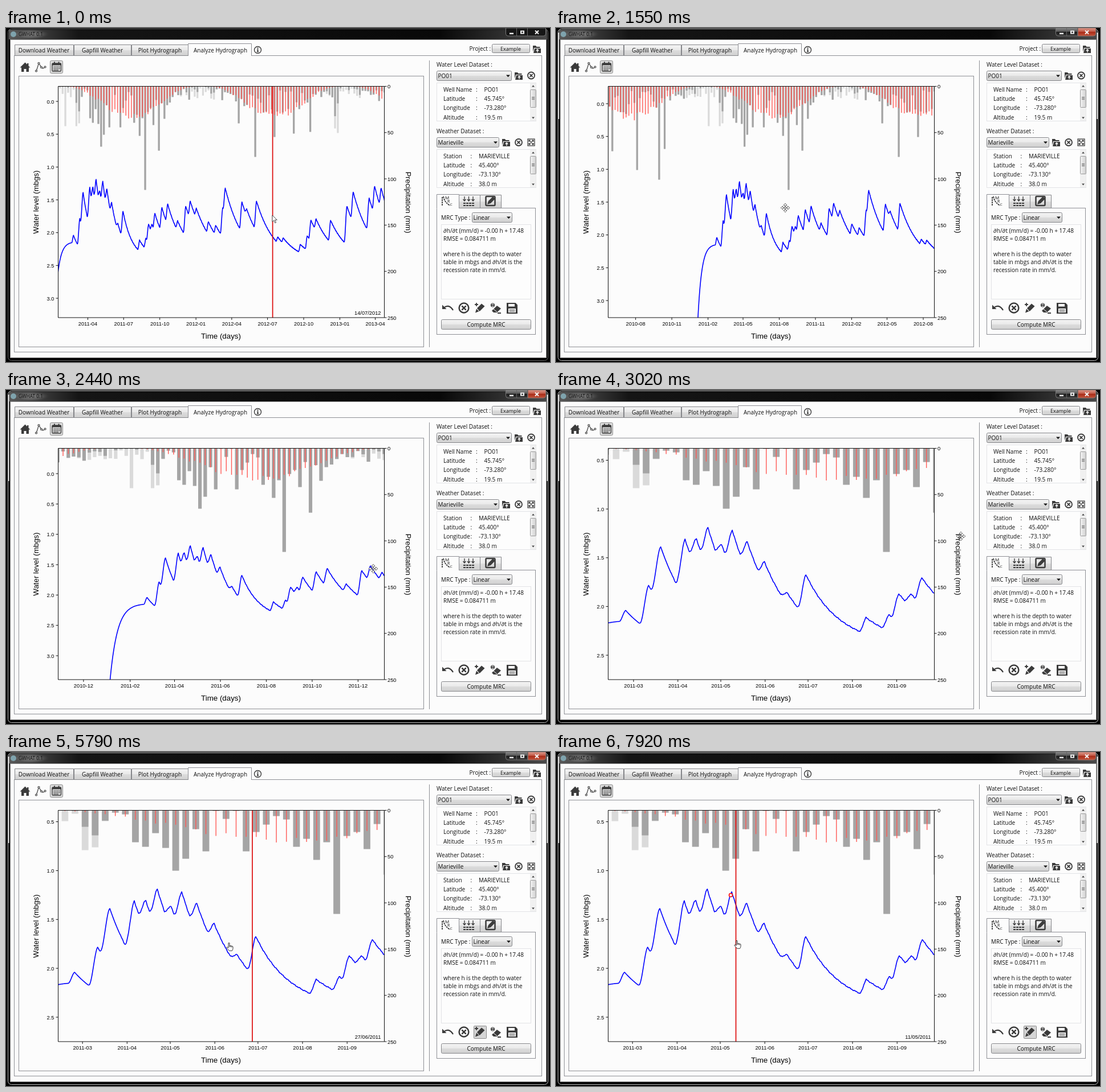
An HTML page for the animation above (8 s loop, 954x587 px).

```html
<!DOCTYPE html>
<html lang="en">
<head>
<meta charset="utf-8">
<title>Hydrograph analysis</title>
<style>
html, body { margin: 0; width: 100%; height: 100%; overflow: hidden; background: #000; }
svg { display: block; }
text { font: 10px "Open Sans", "Noto Sans", sans-serif; fill: #111; white-space: pre; }
.plot text { font: 9.3px "Liberation Sans", sans-serif; fill: #000; }
.plot .title { font-size: 13.33px; }
.mid { text-anchor: middle; }
.end { text-anchor: end; }
.box { fill: #fcfcfc; stroke: #8e8f95; }
.pale { fill: #fdfdfd; stroke: #e2e3e6; }
.btn { fill: url(#face); stroke: #85868a; }
.ink { fill: #3b3b3b; }
.pen { fill: none; stroke: #3b3b3b; stroke-width: 1.8; }
</style>
</head>
<body>
<svg width="954" height="587" viewBox="0 0 954 587">
  <defs>
    <linearGradient id="face" x2="0" y2="1"><stop stop-color="#f4f4f4"/><stop offset=".5" stop-color="#e9e9e9"/><stop offset=".52" stop-color="#dcdcdc"/><stop offset="1" stop-color="#d0d0d0"/></linearGradient>
    <linearGradient id="thumb" x2="1" y2="0"><stop stop-color="#f3f3f3"/><stop offset="1" stop-color="#cfcfcf"/></linearGradient>
    <linearGradient id="red" x2="0" y2="1"><stop stop-color="#dc9a8c"/><stop offset=".45" stop-color="#c25a48"/><stop offset=".5" stop-color="#a82a16"/><stop offset="1" stop-color="#c4553c"/></linearGradient>
    <linearGradient id="grey" x2="0" y2="1"><stop stop-color="#8a8a8a"/><stop offset=".45" stop-color="#555"/><stop offset=".5" stop-color="#1a1a1a"/><stop offset="1" stop-color="#3a3a3a"/></linearGradient>
    <linearGradient id="bar" x2="1" y2="0"><stop stop-color="#5a5a5a"/><stop offset=".13" stop-color="#151515"/><stop offset=".8" stop-color="#080808"/><stop offset="1" stop-color="#4a4a4a"/></linearGradient>
    <radialGradient id="haze"><stop stop-color="#999" stop-opacity=".75"/><stop offset=".6" stop-color="#777" stop-opacity=".5"/><stop offset="1" stop-color="#444" stop-opacity="0"/></radialGradient>
    <clipPath id="axes"><path d="M92 102.500H663V509H92z"/></clipPath>
    <g id="folder"><path class="ink" d="M-7 -6h5l1.500 2h6v2h-10.500l-2 7z"/><path class="ink" d="M-4 -1h11v8h-13z"/><path d="M1 6v-5m-2 2l2 -2.500l2 2.500" fill="none" stroke="#fff" stroke-width="1.300"/></g>
    <g id="cross"><circle class="pen" r="6"/><path class="pen" d="M-2.600 -2.600l5.200 5.200m0 -5.200l-5.200 5.200"/></g>
    <path id="down" d="M-3.500 -1.500h7l-3.500 3.800z" fill="#111"/>
  </defs>

  <!-- window -->
  <rect width="954" height="587"/>
  <rect id="rim" x="3.500" y="1.500" width="947" height="583" rx="6" fill="#050505"/>
  <rect x="5" y="3" width="944" height="17" fill="url(#bar)"/>
  <path id="shine" d="M4.500 8v152M949.500 8v152" stroke="#d8d8d8" stroke-width="2"/>
  <ellipse cx="43" cy="11" rx="33" ry="9" fill="url(#haze)"/>
  <circle cx="13" cy="11" r="5" fill="#7fa3ad"/>
  <text x="22" y="14" style="font-size:8.300px;fill:#080808">GWHAT 0.1</text>
  <path id="buttons" d="M876.500 0v10q0 4 4 4h62q4 0 4 -4v-10z" stroke="#777"/>
  <path id="close" d="M915.500 0h31v10q0 4 -4 4h-27z" fill="url(#red)" stroke="#8b6a64"/>
  <path d="M895.500 0v14M914.500 0v14" stroke="#666"/>
  <path d="M883 8.500h7v2.500h-7zM902 4.500h7v6h-7zM904 6.500v2h3v-2z" fill="#eee" fill-rule="evenodd"/>
  <path d="M928 4.500l6 6m0 -6l-6 6" stroke="#f4f4f4" stroke-width="2"/>
  <rect x="7.500" y="20.500" width="940" height="559" fill="#fcfcfc" stroke="#8a8a8a"/>

  <!-- main tabs -->
  <rect class="box" x="14.500" y="48.500" width="925" height="521"/>
  <path class="btn" d="M15.500 48.500v-19h103v19zM119.500 48.500v-19h100v19zM220.500 48.500v-19h99v19z"/>
  <path d="M319.500 49.500v-22h111v22" fill="#fcfcfc"/>
  <path d="M319.500 49v-21.500h111v21.500" fill="none" stroke="#8e8f95"/>
  <text class="mid" x="66.500" y="43">Download Weather</text>
  <text class="mid" x="169" y="43">Gapfill Weather</text>
  <text class="mid" x="270" y="43">Plot Hydrograph</text>
  <text class="mid" x="376" y="42.500">Analyze Hydrograph</text>
  <circle class="pen" cx="441.500" cy="38.500" r="6" style="stroke-width:1.400"/>
  <path class="ink" d="M440.500 34.500h2v2h-2zM440 37.500h2.500v4h1v1h-4v-1h1v-3h-.500z"/>

  <!-- toolbar -->
  <path class="ink" d="M24.500 69.500l9 -9l3.500 3.500v-2h2.500v4.500l3 3h-2.500v7.500h-4.500v-5h-4v5h-4.500v-7.500z"/>
  <path class="pen" d="M53 76l4.500 -14l4 6l3 3l4 -2" style="stroke-width:1.200"/>
  <g class="pen" style="stroke-width:1.200;fill:#fcfcfc"><circle cx="53" cy="75.500" r="1.500"/><circle cx="57.500" cy="62" r="1.500"/><circle cx="62" cy="69" r="1.500"/><circle cx="68.500" cy="68.500" r="1.500"/></g>
  <rect x="77.500" y="57.500" width="22" height="22" rx="2" fill="#dcdcdc" stroke="#888"/>
  <rect class="pen" x="81" y="62" width="15.500" height="14" rx="1.500" style="stroke-width:1.400"/>
  <path class="ink" d="M81 62h15.500v3.500h-15.500zM84 59.500h2v4h-2zM91.500 59.500h2v4h-2z"/>
  <path d="M83.500 68.500h11M83.500 71.500h11M83.500 74h8" stroke="#3b3b3b" stroke-width="1.500" stroke-dasharray="2 1"/>
  <rect class="box" x="22.500" y="84.500" width="710" height="476"/>
  <path d="M742.500 57v504" stroke="#8e8f95"/>

  <!-- plot -->
  <g class="plot">
    <g clip-path="url(#axes)">
      <path id="snow" fill="#dadada"/>
      <path id="rain" fill="#a5a5a5"/>
      <path id="evap" stroke="#ff5a55" stroke-width="1.400"/>
      <path id="level" fill="none" stroke="#00f" stroke-width="1.600" stroke-linejoin="round"/>
      <path id="line" stroke="#dc0a0a" stroke-width="1.700"/>
      <circle id="pick" cx="306.500" cy="251.500" r="3" fill="#fff" stroke="red" stroke-width="1.500"/>
    </g>
    <path d="M91.500 102.500h572v406.500h-572z" fill="none" stroke="#111"/>
    <g id="ticks"></g>
    <text id="date" class="end" x="657.500" y="503.500"></text>
    <text class="title mid" x="377" y="546">Time (days)</text>
    <text class="title mid" transform="translate(56.500 306) rotate(-90)">Water level (mbgs)</text>
    <text class="title mid" transform="translate(701 306.500) rotate(90)">Precipitation (mm)</text>
  </g>

  <!-- side panel -->
  <text x="812.500" y="40">Project :</text>
  <rect class="btn" x="852.500" y="28.500" width="66" height="15" rx="2"/>
  <text class="mid" x="885" y="39.500" style="font-size:9px">Example</text>
  <use href="#folder" x="931" y="37"/>
  <text x="755" y="68">Water Level Dataset :</text>
  <text x="755" y="185">Weather Dataset :</text>
  <use href="#folder" x="899" y="84"/><use href="#cross" x="921" y="83.500"/>
  <use href="#folder" x="877" y="201"/><use href="#cross" x="899" y="201"/>
  <rect class="pen" x="915" y="195" width="12" height="12" style="stroke-width:1.200"/>
  <path class="pen" d="M917 197l8 8m0 -8l-8 8M917 200v-3h3M922 197h3v3M917 202v3h3M922 205h3v-3" style="stroke-width:1.200"/>

  <rect class="box" x="755.500" y="316.500" width="173" height="222"/>
  <path class="btn" d="M794.500 316.500v-23h37v23zM831.500 316.500v-23h37v23z"/>
  <path d="M755.500 317.500v-25h39v25" fill="#fcfcfc"/>
  <path d="M755.500 317v-24.500h39v24.500" fill="none" stroke="#8e8f95"/>
  <path class="pen" d="M765 312v-16M767 296q2 11 12 16" stroke-dasharray="3 1"/>
  <g style="font-weight:bold"><text x="770" y="301" style="font-size:8px">M</text><text x="774" y="307" style="font-size:7px">R</text><text x="779" y="312" style="font-size:6px">C</text></g>
  <path class="pen" d="M804 296v8m-2.500 -3l2.500 3l2.500 -3M811.500 296v8m-2.500 -3l2.500 3l2.500 -3M819 296v8m-2.500 -3l2.500 3l2.500 -3" style="stroke-width:1.300"/>
  <path class="pen" d="M802 308h19M802 312h19" stroke-dasharray="4 1"/>
  <rect class="pen" x="841.500" y="296" width="16" height="16" rx="1.500" style="stroke-width:2.500"/>
  <path class="ink" d="M844 310l2 -6l8 -8l4 4l-8 8z"/>
  <text x="763" y="337">MRC Type :</text>
  <rect class="pale" x="763.500" y="345.500" width="157" height="131"/>
  <text x="767" y="360">∂h/∂t (mm/d) = -0.00 h + 17.48</text>
  <text x="767" y="373.500">RMSE = 0.084711 m</text>
  <text x="767" y="401">where h is the depth to water</text>
  <text x="767" y="415">table in mbgs and ∂h/∂t is the</text>
  <text x="767" y="428.500">recession rate in mm/d.</text>
  <path class="ink" d="M765 486.500v7.500h7.500z"/><path class="pen" d="M768 491.500q9 -7 16 4.500" style="stroke-width:2.200"/>
  <g transform="translate(803 492) scale(1.400)"><use href="#cross"/></g>
  <rect id="press" x="820.500" y="481.500" width="22" height="22" rx="1" stroke="#8a8a8a"/>
  <path class="ink" d="M823 500.500l2 -7l4.500 4.500zM826 492.500l8 -8l5.500 4.500l-9 9z"/><path class="pen" d="M822 486h6M825 483v6"/>
  <path class="ink" d="M852 497l9 -9l7 5l-7 7h-6z"/><path d="M855 494l6 5" stroke="#fcfcfc"/>
  <path class="pen" d="M850 487h7M862 501h6"/><circle class="pen" cx="853.500" cy="487" r="3" style="stroke-width:1.200"/>
  <path class="ink" d="M878 483h15.500l3.500 3.500v15.500h-19z"/><path d="M881 485h11v4.500h-11zM881 493h13v7h-13z" fill="#fcfcfc"/><path d="M882.500 495.500h10M882.500 498h10" stroke="#3b3b3b"/>
  <rect class="btn" x="763.500" y="512.500" width="157" height="17" rx="2"/>
  <text class="mid" x="842" y="525">Compute MRC</text>
  <g id="sets"></g>

  <!-- pointers -->
  <path id="arrow" d="M0 0v11.500l2.700 -2.500l2 4.600l1.900 -.800l-2 -4.500h3.700z" fill="#fff" stroke="#222" stroke-width=".8"/>
  <g id="move" fill="#fff" stroke="#333" stroke-width=".7"><path d="M0 -8l3 3.500h-2v2h-2v-2h-2zM0 8l3 -3.500h-2v-2h-2v2h-2zM-8 0l3.500 -3v2h2v2h-2v2zM8 0l-3.500 -3v2h-2v2h2v2z"/><circle r="1.500"/></g>
  <g id="hand" fill="#fff" stroke="#222" stroke-width=".9"><path d="M-1 1q1 -2 2 0v4.500q1.200 -1 2 .300q1.300 -.700 2 .500q1.600 -.500 2 1v3q0 2 -1.500 4h-5q-2 -2.500 -4.500 -5q-.500 -2 1.500 -1.200l1.500 1.200z"/><path d="M1 5.500v2.500M3 6v2M5 6.500v2" fill="none"/></g>
</svg>

<script>
const $ = id => document.getElementById(id);
const DAY = 864e5, EPOCH = Date.UTC(2011, 0, 1);
const LEFT = 92, RIGHT = 663, TOP = 102.5, BOTTOM = 509;
const fix = n => n.toFixed(2);
const clamp = n => Math.min(1, Math.max(0, n));
const noise = k => { const s = Math.sin(k * 78.233 + 4.1) * 43758.5453; return s - Math.floor(s); };
const season = day => Math.cos((day - 17) / 365 * 2 * Math.PI);
const text = (x, y, s, cls = "") => `<text class="${cls}" x="${x}" y="${y}">${s}</text>`;

// A view: [x of 1 May 2011, px per day, y of 1.5 m, px per metre]
const WIDE = [164.2, .6895, 302, 115.33];
const PANNED = [328, .69, 306, 115.33];
const HALF = [335.1, 1.319, 307, 106.67];
const NEAR = [289, 2.508, 294.8, 171.3];
const CLOSE = [288, 2.522, 294.3, 171.75];
const xOf = (v, day) => v[0] + (day - 120) * v[1];
const dayAt = (v, x) => 120 + (x - v[0]) / v[1];
const yOf = (v, h) => v[2] + (h - 1.5) * v[3];

// Recharge: the water rises from this day up to this depth, then recedes
const recharge = [[49, 2.04], [63.5, 1.78], [71.5, 1.388], [88.7, 1.306], [98.2, 1.306], [106, 1.184], [116.4, 1.36],
  [123, 1.213], [133.9, 1.335], [146.2, 1.54], [162.4, 1.86], [173.9, 1.667], [217.1, 2.11], [233, 2.085],
  [239.3, 1.871], [248.9, 1.871], [255.6, 1.702], [272.8, 1.62], [288, 1.556], [314, 1.82], [333, 1.594],
  [345.6, 1.519], [361.6, 1.63], [392, 1.83], [411, 1.89], [427, 1.62], [434, 1.318], [475.8, 1.535], [490, 1.64],
  [513, 1.517], [569, 2.064], [583, 2.08], [626, 2.18], [643, 2.05], [652, 1.812], [666, 1.79], [702, 1.81],
  [742, 1.595], [759, 1.379], [799, 1.474], [813.7, 1.292], [831, 1.318]];

function waterLevel() {
  const out = [], base = 2.45, dt = .5;
  let next = 0, rise = null, h = 0;
  for (let d = 3; d < 846; d += dt) {
    if (next < recharge.length && d >= recharge[next][0]) {
      const [start, peak] = recharge[next++];
      const top = Math.min(peak, h - .01);
      rise = { start, from: h, top, days: 4 + 6 * (h - top) };
    }
    const u = rise && (d - rise.start) / rise.days;
    if (!rise) h = 2.14 + 1.3 * Math.exp((4 - d) / 9.8);
    else if (u < 1) h = rise.from + (rise.top - rise.from) * u * u * (3 - 2 * u);
    else h += (base - h) * dt / (25 + 22 * clamp((d - 180) / 170));
    out.push([d, h + (d > 85 ? .006 * Math.sin(d * 2.7) * Math.sin(d * 1.13) : 0)]);
  }
  return out;
}
const level = waterLevel();

// Weekly bars, depth in px; week 0 is centred on day 46.8
const weekDay = w => 46.8 + 7 * w;
const spring = [19, 6, 70, 65, 19, 4, 7, 56, 64, 40, 66, 106, 85, 33, 72, 1,
  15, 1, 72, 38, 25, 10, 16, 64, 50, 87, 56, 182, 45, 38, 68, 24];
const storms = { "-37": 114, "-28": 147, "-20": 164, "-18": 110, "-2": 70, 32: 113, 34: 57, 61: 65, 67: 124,
  74: 89, 81: 83, 87: 80, 96: 74, 97: 82 };
const precip = w => spring[w] ?? storms[w] ?? (6 + 42 * noise(w)) * (.75 - .3 * season(weekDay(w)));
const rainShare = w => clamp(2.6 - 3 * season(weekDay(w)) + (w < 0 || w > 40 ? noise(w + 90) : 0));
const evapOf = w => 54 * (.5 - .5 * season(weekDay(w))) ** 1.4 * (.88 + .24 * noise(w + 300));

function drawBars(v) {
  const wide = v[1] * 4.65;
  const bar = (x, len) => `M${fix(x - wide / 2)} ${TOP}h${fix(wide)}v${fix(len)}h${fix(-wide)}z`;
  let rain = "", snow = "", evap = "";
  for (let w = -39; w < 115; w++) {
    const x = xOf(v, weekDay(w)), total = precip(w);
    if (x < LEFT - 15 || x > RIGHT + 15) continue;
    snow += bar(x, total);
    rain += bar(x, total * rainShare(w));
    evap += `M${fix(x)} ${TOP}v${fix(evapOf(w))}`;
  }
  $("rain").setAttribute("d", rain);
  $("snow").setAttribute("d", snow);
  $("evap").setAttribute("d", evap);
}

function drawTicks(v) {
  let marks = "", labels = "";
  const first = new Date(EPOCH + dayAt(v, LEFT) * DAY);
  const months = (RIGHT - LEFT) / v[1] / 30.44;
  const step = months < 11 ? 1 : months < 22 ? 2 : 3;
  for (let k = 0; k < 40; k += step) {
    const at = Date.UTC(first.getUTCFullYear(), first.getUTCMonth() + k, 1);
    const x = xOf(v, (at - EPOCH) / DAY);
    if (x < LEFT || x > RIGHT) continue;
    marks += `M${fix(x)} 509v4`;
    labels += text(fix(x), 523, new Date(at).toISOString().slice(0, 7), "mid");
  }
  for (let h = -1; h < 5; h += .5) {
    const y = yOf(v, h);
    if (y < TOP || y > BOTTOM) continue;
    marks += `M91.500 ${fix(y)}h-4`;
    labels += text(84.5, fix(y + 3.5), h.toFixed(1), "end");
  }
  for (let mm = 0; mm <= 250; mm += 50) {
    const y = TOP + mm * 1.626;
    marks += `M663.500 ${fix(y)}h4`;
    labels += text(669, fix(y + 3.5), mm);
  }
  $("ticks").innerHTML = `<path d="${marks}" stroke="#111"/>${labels}`;
}

function drawPlot(v) {
  drawBars(v);
  drawTicks(v);
  $("level").setAttribute("d", "M" + level.map(([d, h]) => fix(xOf(v, d)) + " " + fix(yOf(v, h))).join("L"));
}

// Side panel boxes
const combo = (x, y, w, label) => `<rect class="btn" x="${x}" y="${y}" width="${w}" height="17" rx="2"/>`
  + text(x + 2, y + 12, label) + `<use href="#down" x="${x + w - 6}" y="${y + 8.5}"/>`;
function infoBox(y, thumb, colon, rows) {
  const mid = thumb + 15;
  return `<rect class="pale" x="755.500" y="${y}" width="174" height="67"/>
    <rect x="919" y="${y + .5}" width="10.500" height="66" fill="#f0f0f0"/>
    <rect x="919.500" y="${thumb}" width="10" height="31" rx="1" fill="url(#thumb)" stroke="#999"/>
    <path d="M922 ${mid - 2}h5m-5 2h5m-5 2h5" stroke="#555" stroke-width=".8"/>
    <path d="M922 ${y + 7}h5l-2.500 -3zM922 ${y + 60}h5l-2.500 3z" fill="#444"/>`
    + rows.map(([name, value], i) => {
      const base = fix(y + 15 + i * 16.4);
      return text(767, base, name) + text(colon, base, ":") + text(colon + 14.5, base, value);
    }).join("");
}
$("sets").innerHTML = combo(755.5, 75.5, 131, "PO01") + combo(755.5, 192.5, 109, "Marieville") + combo(817.5, 324.5, 70, "Linear")
  + infoBox(96.5, 108.5, 824, [["Well Name", "PO01"], ["Latitude", "45.745°"], ["Longitude", "-73.280°"], ["Altitude", "19.5 m"]])
  + infoBox(213.5, 225.5, 814.5, [["Station", "MARIEVILLE"], ["Latitude", "45.400°"], ["Longitude", "-73.130°"], ["Altitude", "38.0 m"]]);

const steps = [[560, 970, 4], [970, 1550, 5], [1700, 2440, 6], [2440, 2740, 3], [2860, 3020, 2], [3170, 3330, 2],
  [4040, 4850, 7], [5120, 5250, 2], [5530, 5790, 3], [5910, 6420, 5], [6820, 6940, 2], [7500, 7920, 4]]
  .flatMap(([a, b, n]) => Array.from({ length: n }, (_, i) => Math.floor(a + (b - a) * i / (n - 1))));

const pointerKeys = [[420, 467, 329], [970, 205, 313], [1115, 238, 312], [1260, 250, 313], [1550, 402, 316],
  [1700, 402, 318], [1990, 389, 327], [2440, 644, 314], [2740, 701, 288], [3020, 710, 257], [3900, 710, 257],
  [4850, 832, 499], [5400, 832, 501], [5790, 391, 335], [6420, 308, 335], [7400, 308, 335], [7920, 317, 331]];
const lineKeys = [[420, 467.6], [970, 205.4], [1115, 238.5], [1700, 402.5], [1990, 389.5], [5660, 600], [5790, 432],
  [5910, 380], [6420, 306.5], [7400, 306.5], [7920, 315.5]];
const viewKeys = [[1115, ...WIDE], [1550, ...PANNED], [1990, ...PANNED], [2440, ...HALF], [3020, ...NEAR], [3170, ...CLOSE]];

function at(keys, t) {
  const i = keys.findIndex(k => k[0] >= t);
  if (i < 1) return keys.at(i).slice(1);
  const a = keys[i - 1], b = keys[i], u = (t - a[0]) / (b[0] - a[0]);
  return a.slice(1).map((n, j) => n + (b[j + 1] - n) * u);
}
const logKeys = viewKeys.map(([t, x, s, y, v]) => [t, x, Math.log(s), y, Math.log(v)]);
const viewAt = t => { const [x, s, y, v] = at(logKeys, t); return [x, Math.exp(s), y, Math.exp(v)]; };
const show = (id, on) => $(id).setAttribute("visibility", on ? "visible" : "hidden");

function pointerKind(t) {
  if (t >= 5600) return "hand";
  return t >= 1250 && t < 1700 || t >= 1990 && t < 3300 ? "move" : "arrow";
}

function update(t) {
  const view = viewAt(t), [x] = at(lineKeys, t), [px, py] = at(pointerKeys, t);
  drawPlot(view);

  const tracking = t < 1250 || t >= 1700 && t < 1990 || t >= 5600 && !(t >= 6820 && t < 6940);
  show("line", tracking);
  show("date", tracking);
  $("line").setAttribute("d", `M${fix(x)} ${TOP}V${BOTTOM}`);
  const iso = new Date(EPOCH + Math.floor(dayAt(view, x)) * DAY).toISOString().slice(0, 10);
  $("date").textContent = iso.split("-").reverse().join("/");
  show("pick", t >= 6820);

  const active = t >= 1250;
  show("close", active);
  show("shine", active);
  $("rim").setAttribute("stroke", active ? "#c4c4c4" : "#666");
  $("buttons").setAttribute("fill", active ? "url(#grey)" : "#161616");
  show("press", t >= 4850);
  $("press").setAttribute("fill", t >= 5120 ? "#d6d6d6" : "#ececec");

  const kind = pointerKind(t);
  for (const id of ["arrow", "move", "hand"]) show(id, id === kind);
  $(kind).setAttribute("transform", `translate(${fix(px)} ${fix(py)})`);
}

let shown = -1;
function frame(now) {
  const t = now % 8000;
  const step = steps.filter(s => s <= t).at(-1) ?? 0;
  if (step !== shown) update(shown = step);
  requestAnimationFrame(frame);
}
update(shown = 0);
requestAnimationFrame(frame);
</script>
</body>
</html>
```
